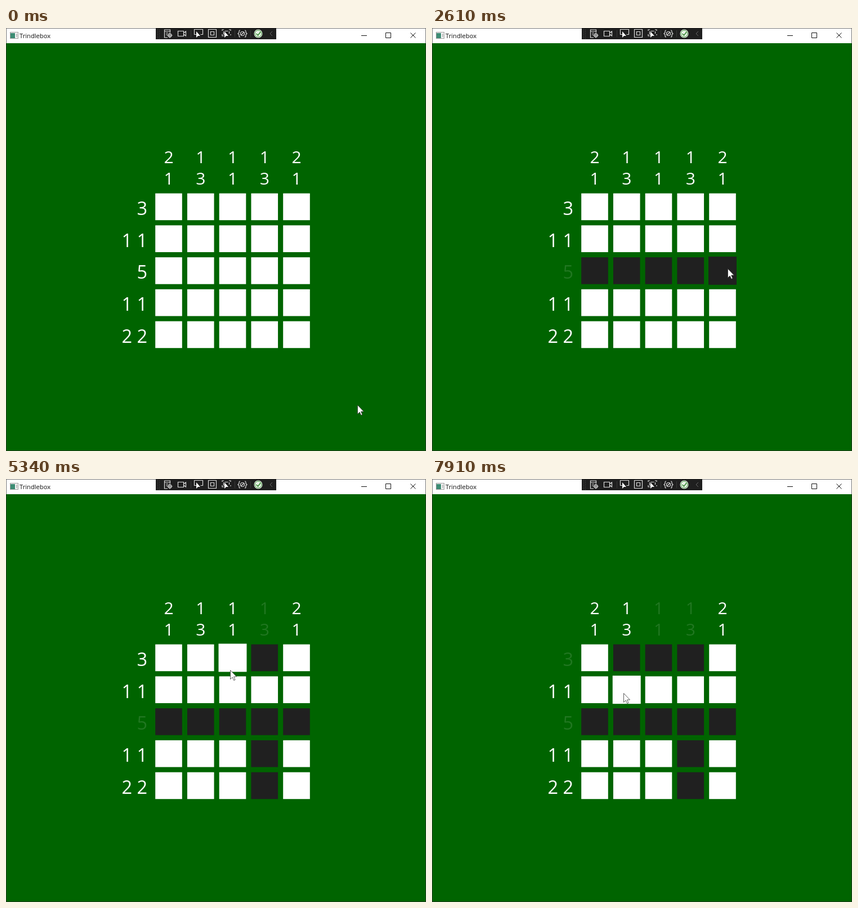
An HTML page that plays this animation: 746x751 px, repeating every 8000 ms.

```html
<!DOCTYPE html>
<html lang="en">
<head>
<meta charset="utf-8">
<title>Trindlebox</title>
<style>
  html, body { margin: 0; width: 100%; height: 100%; overflow: hidden; background: #006400; }
  svg { display: block; width: 746px; height: 751px; }
  text { font-family: "Open Sans", "Noto Sans", sans-serif; }
  .hint { fill: #fff; }
  .hint.done { fill: #217721; }
  .col { font-size: 30px; text-anchor: middle; }
  .row { font-size: 32.5px; text-anchor: end; }
</style>
</head>
<body>
<svg viewBox="0 0 746 751">
  <rect x=".5" y=".5" width="745" height="750" fill="#006400" stroke="#1d3b1d"/>
  <rect x=".5" y=".5" width="745" height="26" fill="#fff" stroke="#777"/>
  <rect x="1" y="25" width="744" height="2" fill="#fff"/>

  <!-- title bar -->
  <rect x="7.5" y="7.5" width="14" height="11" fill="#f4f4f4" stroke="#9a9a9a"/>
  <rect x="8" y="9" width="8" height="9" fill="#3d8c74"/>
  <path d="M18 11h2M18 13h2M18 15h2" stroke="#888"/>
  <text x="24" y="18" font-size="11.2" fill="#111">Trindlebox</text>
  <path d="M631 13.5h10M674.5 8.5h9v9h-9zM718.5 8.5l9 9M727.5 8.5l-9 9" fill="none" stroke="#111"/>

  <!-- debug toolbar -->
  <rect x="266" width="214" height="20" fill="#1f1f1f"/>
  <path d="M269.5 2v16M272.5 3v16" stroke="#555" stroke-dasharray="1 2"/>
  <path d="M328.5 4v12M406.5 4v12M434.5 4v12" stroke="#3a3a3a"/>
  <g fill="none" stroke="#ddd" stroke-width="1.2">
    <path d="M287 17h-5.500v-14h10v5M281 6h10M284 9h4M284 12h3"/>
    <circle cx="291" cy="13" r="3"/>
    <path d="M291 8.500v9M286.500 13h9"/>
    <path d="M305.500 5.500h10v9h-10zM315.500 9l4-3v8l-4-3"/>
    <path d="M338 11.500h-3.500v-9h15v9h-4"/>
    <path d="M359.500 2.500h14v14h-14zM363.500 6.500h6v6h-6z"/>
    <path d="M384 5v-2h3M396 3h3v2M384 11v3h3M399 11v2M388.500 5.500h6M386.500 6v5h2M396.500 6v4"/>
    <path d="M416 4q-2 0-2 2v2l-2 2 2 2v2q0 2 2 2M424 4q2 0 2 2v2l2 2-2 2v2q0 2-2 2M417 13l6-6"/>
    <circle cx="420" cy="10" r="3.500"/>
  </g>
  <path id="mini" d="M338 6v11l3-3h4z" fill="#fff"/>
  <use href="#mini" x="50"/>
  <circle cx="448" cy="10" r="7.500" fill="#e8f3e6"/>
  <circle cx="448" cy="10" r="6" fill="none" stroke="#388a34"/>
  <path d="M444.500 10l3 3 4.500-6" fill="none" stroke="#388a34" stroke-width="1.700"/>
  <path d="M473 6l-4 4 4 4" fill="none" stroke="#666"/>

  <g id="board"></g>
  <circle id="press" r="11.500" fill="#9bdc28" fill-opacity=".62"/>
  <path id="cursor" d="M.5 .5V16.500L4.200 13L6.700 18.500L9 17.500L6.600 12H11.500Z" fill="#fff" stroke="#333" stroke-width=".8"/>
</svg>
<script>
const LOOP = 8000, LAG = 60, HOLD = 85;
const X0 = 265.2, Y0 = 293.6, PITCH = 56.75, SIZE = 47.6;
const colHints = ['2 1', '1 3', '1 1', '1 3', '2 1'];
const rowHints = ['3', '1 1', '5', '1 1', '2 2'];
const range = [0, 1, 2, 3, 4];
const $ = id => document.getElementById(id);

// Pointer positions are in cells: the whole part is the cell, the rest the place inside it.
const moves = [], clicks = [];

function go(arrive, duration, col, row) {
  moves.push({ arrive, duration, col, row });
}

function click(time, duration, col, row) {
  go(time - 30, duration, col, row);
  clicks.push({ time, col: Math.floor(col), row: Math.floor(row) });
}

go(0, 1, 6.32, 6.62);
go(150, 120, 6.5, 6.45);
go(600, 450, 0.6, 1.7);
go(820, 220, 0.21, 2.41);
for (const c of range) click(1280 + 260 * c, 190, 0.21 + 1.09 * c, 2.35);
click(3250, 310, 3.57, 3.6);
click(3490, 120, 3.55, 4.4);
click(3900, 300, 3.68, 0.57);
go(4520, 270, 2.62, 0.58);
go(5600, 290, 1.67, 1.35);
go(5820, 220, 1.53, 0.59);
click(5990, 100, 1.53, 0.59);
click(6490, 210, 2.34, 0.64);
go(6790, 270, 1.76, 1.7);
go(7170, 350, 1.23, 1.79);
go(7550, 120, 1.25, 1.66);
go(7910, 60, 1.32, 1.52);

function pointer(t) {
  let { col, row } = moves[0];
  for (const m of moves) {
    const p = Math.min(1, Math.max(0, 1 - (m.arrive - t) / m.duration));
    const ease = 1 - (1 - p) ** 3;
    col += (m.col - col) * ease;
    row += (m.row - row) * ease;
  }
  return { col, row };
}

function add(tag, attrs, text = '') {
  const el = document.createElementNS('http://www.w3.org/2000/svg', tag);
  set(el, attrs);
  el.textContent = text;
  return $('board').appendChild(el);
}

function set(el, attrs) {
  for (const k in attrs) el.setAttribute(k, attrs[k]);
}

const cells = range.map(() => range.map(() => add('rect', {})));
const colText = colHints.map((h, c) => h.split(' ').map((n, i) =>
  add('text', { class: 'hint col', x: X0 + PITCH * c + SIZE / 2, y: 239.8 + 37.8 * i }, n)));
const rowText = rowHints.map((h, r) =>
  [add('text', { class: 'hint row', x: 251, y: 331.8 + PITCH * r }, h)]);

const inside = (v, i) => v >= i && v <= i + SIZE / PITCH;

// lengths of the filled runs, written like a hint
const runs = line => line.map(Number).join('').split('0').filter(Boolean).map(s => s.length).join(' ');

function mark(texts, done) {
  texts.forEach(el => el.classList.toggle('done', done));
}

function draw() {
  const t = performance.now() % LOOP;
  const now = pointer(t), late = pointer(t - LAG);
  const pressed = clicks.some(k => t >= k.time && t < k.time + HOLD);
  const filled = range.map(r => range.map(c =>
    clicks.some(k => k.col === c && k.row === r && t >= k.time)));

  for (const r of range) for (const c of range) {
    const hover = !pressed && inside(late.col, c) && inside(late.row, r);
    const grow = hover ? SIZE * 0.025 : 0;
    set(cells[r][c], {
      x: X0 + PITCH * c - grow, y: Y0 + PITCH * r - grow,
      width: SIZE + 2 * grow, height: SIZE + 2 * grow,
      fill: filled[r][c] ? '#202020' : '#fff'
    });
  }
  for (const i of range) {
    mark(rowText[i], runs(filled[i]) === rowHints[i]);
    mark(colText[i], runs(filled.map(row => row[i])) === colHints[i]);
  }

  const x = Math.round(X0 + PITCH * now.col), y = Math.round(Y0 + PITCH * now.row);
  set($('cursor'), { transform: `translate(${x} ${y})` });
  set($('press'), { transform: `translate(${x} ${y})`, visibility: pressed ? 'visible' : 'hidden' });
  requestAnimationFrame(draw);
}
draw();
</script>
</body>
</html>
```
